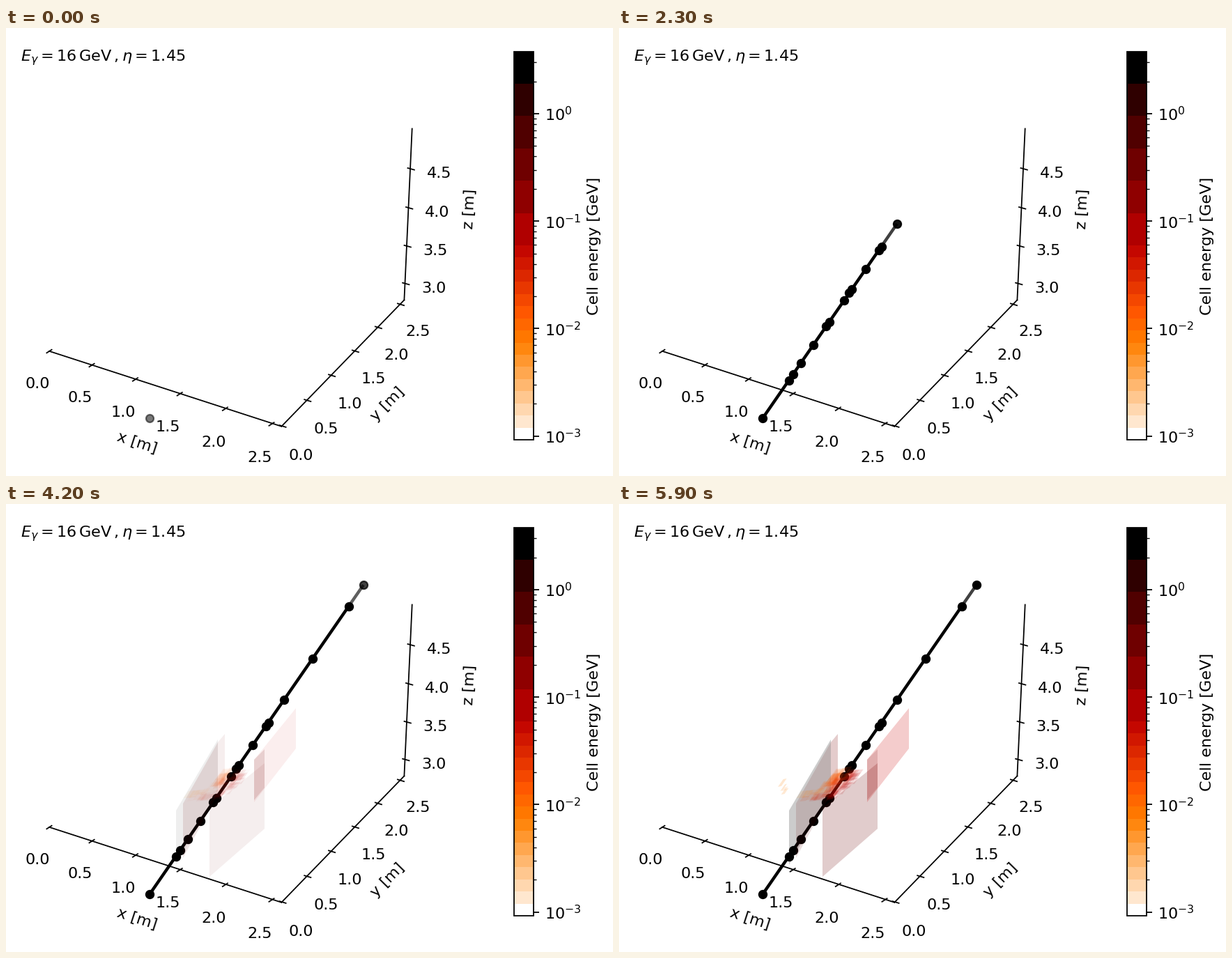
Write a matplotlib script that moves like this. It is 871x643 px and loops after 6.9 s.

```python
import numpy as np
import matplotlib.pyplot as plt
from matplotlib.animation import FuncAnimation
from matplotlib.patches import Polygon, Rectangle

W, H, DPI = 871, 643, 160
FRAMES, STEP = 69, 100
TRACK_END, DONE = 28, 59       # last hit appears, everything settled
FONT, THIN = 10.1, 0.8
heat = plt.get_cmap("gist_heat")
rng = np.random.default_rng(5)

plt.rcParams["font.family"] = "DejaVu Sans"
plt.rcParams["mathtext.fontset"] = "dejavusans"

fig = plt.figure(figsize=(W / DPI, H / DPI), dpi=DPI, facecolor="white")
ax = fig.add_axes([0, 0, 1, 1])
ax.set_xlim(0, W)
ax.set_ylim(H, 0)
ax.axis("off")


def line(p, q, lw=THIN, **kw):
    return ax.plot([p[0], q[0]], [p[1], q[1]], color="black", lw=lw, **kw)[0]


def label(x, y, text, **kw):
    style = dict(fontsize=FONT, ha="center", va="center", color="black")
    ax.text(x, y, text, **{**style, **kw})


def spread(p, q, depth, n):
    """n points from p to q, evenly spaced in space and seen in perspective."""
    u = np.linspace(0, 1, n)[:, None]
    return (np.array(p) * (1 - u) + np.array(q) * depth * u) / (1 - u + depth * u)


def draw_axis(start, end, ticks, texts, depth, n, first, half):
    """Axis line with ticks and numbers; ticks and texts give first and last place."""
    line(start, end)
    for i, (tick, place) in enumerate(zip(spread(*ticks, depth, n), spread(*texts, depth, n))):
        line(tick - half, tick + half)
        label(place[0], place[1] + 8.2, f"{first + 0.5 * i:.1f}", va="baseline")


def draw_axes():
    front, side = (395.3, 571.8), (571.4, 390.4)
    draw_axis((62, 463.8), front, [(62, 464), (381, 568.5)], [(45, 508.5), (364.5, 614.5)],
              0.947, 6, 0, np.array([3.6, -2.3]))
    draw_axis(front, side, [(397, 571.5), (566.5, 396.8)], [(423.5, 611.5), (591.5, 434)],
              1.07, 6, 0, np.array([4.6, 1.4]))
    draw_axis(side, (582.7, 144.5), [(573.8, 367), (581.2, 202.3)], [(613.5, 371.5), (622, 207)],
              0.97, 4, 3, np.array([4.7, 1.3]))
    label(187.5, 596, "x [m]", rotation=-18)
    label(547.5, 540, "y [m]", rotation=45.5)
    label(665.5, 259.5, "z [m]", rotation=87.3)
    label(21.2, 47, r"$E_\gamma = 16\,\mathrm{GeV}\,, \eta = 1.45$", ha="left", va="baseline")


def draw_colorbar():
    left, right, top, knee, bottom = 729, 757, 33.6, 312, 591
    edges = np.r_[np.linspace(top, knee, 7), np.linspace(knee, bottom, 17)[1:]]
    shades = ((edges[:-1] + edges[1:]) / 2 - top) / (bottom - top)
    shades[0], shades[-1] = 0, 1
    for y0, y1, s in zip(edges[:-1], edges[1:], shades):
        ax.add_patch(Rectangle((left, y0), right - left, y1 - y0, fc=heat(s), lw=0, snap=True))
    ax.add_patch(Rectangle((left, top), right - left, bottom - top, fill=False, ec="black", lw=THIN))

    for k in range(-3, 1):
        for m in range(1, 10):
            y = 123 - 154.2 * (k + np.log10(m))
            if y > top:
                size, lw = (7.8, THIN) if m == 1 else (4.4, 0.6)
                line((right, y), (right + size, y), lw, solid_capstyle="butt")
        label(773.2, 123 - 154.2 * k, f"$10^{{{k}}}$", ha="left", va="center_baseline")
    label(844.5, 313, "Cell energy [GeV]", rotation=90)


def draw_track():
    """Hits on one straight line, given by their height on screen."""
    y = np.array([560, 506, 496.5, 480.5, 455, 428, 422, 390.5, 380.2,
                  374.5, 346, 318.5, 313.5, 281, 222, 147, 116.2])
    pts = np.c_[206.2 + (560 - y) * 0.691, y]
    dots = [ax.plot(*p, "o", color="black", ms=5, mew=1, zorder=3)[0] for p in pts]
    segments = [line(p, q, 2, solid_capstyle="butt", zorder=2) for p, q in zip(pts, pts[1:])]
    births = np.round((TRACK_END - 0.2) * np.linspace(0, 1, len(y)) ** 1.13)
    return dots, segments, births


cells = []                     # (patch, birth, duration, final alpha)


def add_cell(points, color, birth, duration, alpha):
    patch = Polygon(points, closed=True, fc=color, ec="none", lw=0, zorder=4)
    ax.add_patch(patch)
    cells.append((patch, birth, duration, alpha))


def add_wall(p, q, height, red, birth, alpha=0.2):
    """Upright cell face with the top edge p-q."""
    (x0, y0), (x1, y1) = p, q
    add_cell([p, q, (x1, y1 + 0.95 * height), (x0, y0 + height)],
             (red, 0, 0), birth, 16, alpha)


def add_tiles(n, origin, along, across, size, shade, births, alpha):
    """Flat leaning tiles scattered over a parallelogram, hotter near its first edge."""
    for a, b in rng.random((n, 2)):
        x, y = np.array(origin) + a * np.array(along) + b * np.array(across)
        w, s = rng.uniform(0.6, 1.3, 2) * size
        tile = np.array([(0, 0), (w, -1), (w + 0.7 * s, -1 - s), (0.7 * s, -s)])
        birth = rng.uniform(*births)
        add_cell(tile - tile.mean(axis=0) + (x, y), heat(shade + 0.24 * b),
                 birth, DONE - birth, alpha)


def build_cells():
    early, late = 32, 39
    add_wall((244, 440), (304, 338), 78, 0, late)
    add_wall((254, 430), (304, 342), 78, 0.4, early, 0.13)
    add_wall((304, 342), (314, 330), 72, 0.47, late)
    add_wall((292, 436), (371, 372), 99, 0.42, late)
    add_wall((356, 367), (416, 293), 61, 0.8, late)
    add_wall((356, 367), (371, 352), 58, 0.43, early, 0.15)
    add_tiles(14, (266, 427), (34, -8), (-4, -10), (12, 9), 0.52, (early, 42), 0.11)
    add_tiles(60, (311, 420), (34, -32), (-24, -10), (11, 12), 0.46, (early, 42), 0.14)
    add_tiles(4, (233, 400), (4, 15), (3, -3), (4, 9), 0.68, (42, 46), 0.2)


draw_axes()
draw_colorbar()
dots, segments, births = draw_track()
build_cells()


def fade(artists, starts, f, rate, last_rate):
    """Half opaque at birth, then darkening; the newest part does so slowly."""
    for artist, start in zip(artists, starts):
        speed = last_rate if artist is artists[-1] else rate
        artist.set_alpha(min(0.53 + speed * (f - start), 1) if f >= start else 0)


def update(f):
    fade(dots, births, f, 0.4, 0.015)
    fade(segments, births[1:], f, 0.22, 0.007)
    for patch, birth, duration, alpha in cells:
        t = np.clip((f - birth) / duration, 0, 1)
        patch.set_alpha(alpha * t * (2 - t))
    return dots + segments + [c[0] for c in cells]


anim = FuncAnimation(fig, update, frames=FRAMES, interval=STEP, repeat=True, blit=False)
plt.show()
```
